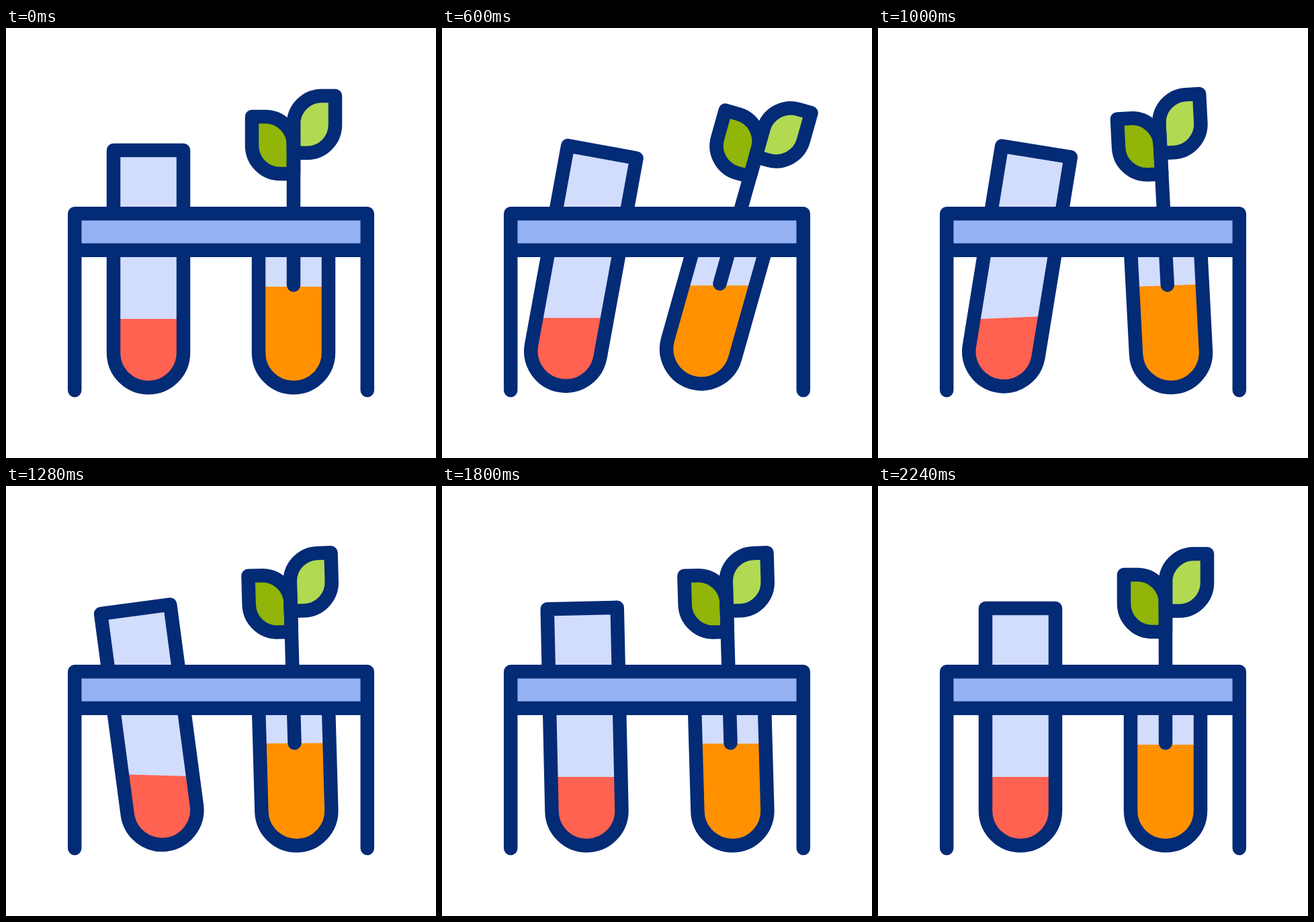
Animation, 640 px wide and 640 px high, one loop 2.4 s. Source, as an HTML page:

```html
<!DOCTYPE html>
<html lang="en">
<head>
<meta charset="utf-8">
<title>Test tube rack</title>
<style>
  html, body { margin: 0; width: 100%; height: 100%; overflow: hidden; background: #fff; }
  svg { display: block; width: 100vw; height: 100vh; }
  .line { fill: none; stroke: #032b76; stroke-width: 20.5; stroke-linecap: round; stroke-linejoin: round; }
  .glass { fill: #d2dcfc; }
</style>
</head>
<body>
<svg viewBox="0 0 640 640">
  <defs>
    <path id="tallTube" d="M160 182H264V483.3A52 52 0 0 1 160 483.3Z"/>
    <path id="shortTube" d="M376 305H480V483.3A52 52 0 0 1 376 483.3Z"/>
    <clipPath id="tallClip"><use href="#tallTube"/></clipPath>
    <clipPath id="shortClip"><use href="#shortTube"/></clipPath>
  </defs>
  <g id="left">
    <use href="#tallTube" class="glass"/>
    <g clip-path="url(#tallClip)"><rect class="liquid" width="400" height="300" fill="#ff6250"/></g>
    <use href="#tallTube" class="line"/>
  </g>
  <g id="right">
    <use href="#shortTube" class="glass"/>
    <g clip-path="url(#shortClip)"><rect class="liquid" width="400" height="300" fill="#ff9100"/></g>
    <use href="#shortTube" class="line"/>
    <path class="line" style="fill:#91b508" d="M366 132H386A42 42 0 0 1 428 174V217H408A42 42 0 0 1 366 175Z"/>
    <path class="line" style="fill:#b1d952" d="M490 101H470A42 42 0 0 0 428 143V186H448A42 42 0 0 0 490 144Z"/>
    <path class="line" d="M428 143V382.5"/>
  </g>
  <path fill="#94b1f3" d="M102 276H538V331H102Z"/>
  <path class="line" d="M102.2 539.2V276.3H537.8V539.2M102.2 330.7H537.8"/>
</svg>
<script>
  const LOOP = 2400, STEP = 40, PIVOT_Y = 329;
  const swingTimes = [200, 740, 1108, 1431, 1740, 2120];
  const swingAngles = [0, 18.9, -8.7, 4.2, -1.75, 0];

  const tubes = [
    { id: 'left', x: 212, level: 433, delay: 113, lift: [0, 0.3, -1.6, 0, 0, 0] },
    { id: 'right', x: 428, level: 385, delay: 0, lift: [0, 0.5, -2.3, -2, -1.6, 0] }
  ];
  for (const tube of tubes) {
    tube.group = document.getElementById(tube.id);
    tube.liquid = tube.group.querySelector('.liquid');
  }

  const ease = u => u * u * (3 - 2 * u);

  function phase(t) {
    let i = 0;
    while (i < swingTimes.length - 2 && t >= swingTimes[i + 1]) i++;
    const u = (t - swingTimes[i]) / (swingTimes[i + 1] - swingTimes[i]);
    return { i, u: Math.min(1, Math.max(0, u)) };
  }

  const between = (values, { i, u }) => values[i] + (values[i + 1] - values[i]) * ease(u);

  // The surface stays almost level, sloshing during the second and third swings.
  function slosh({ i, u }) {
    if (i === 1) return -2.5 * Math.sin(Math.PI * u);
    if (i === 2) return 1.8 * Math.sin(2 * Math.PI * u);
    return 0;
  }

  function drawTube({ group, liquid, x, level, delay, lift }, t) {
    const p = phase(t - delay);
    const angle = between(swingAngles, p);
    const rad = angle * Math.PI / 180;
    const y = PIVOT_Y + (level - PIVOT_Y) * Math.cos(rad) + between(lift, p);
    const cx = x - (y - PIVOT_Y) * Math.tan(rad);
    group.setAttribute('transform', `rotate(${angle} ${x} ${PIVOT_Y})`);
    liquid.setAttribute('transform',
      `rotate(${-angle} ${x} ${PIVOT_Y}) translate(${cx} ${y}) rotate(${slosh(p)}) translate(-200 0)`);
  }

  function draw(time) {
    const t = Math.floor((time % LOOP) / STEP) * STEP;
    for (const tube of tubes) drawTube(tube, t);
  }

  let start;
  function tick(now) {
    start ??= now;
    draw(now - start);
    requestAnimationFrame(tick);
  }
  draw(0);
  requestAnimationFrame(tick);
</script>
</body>
</html>
```
